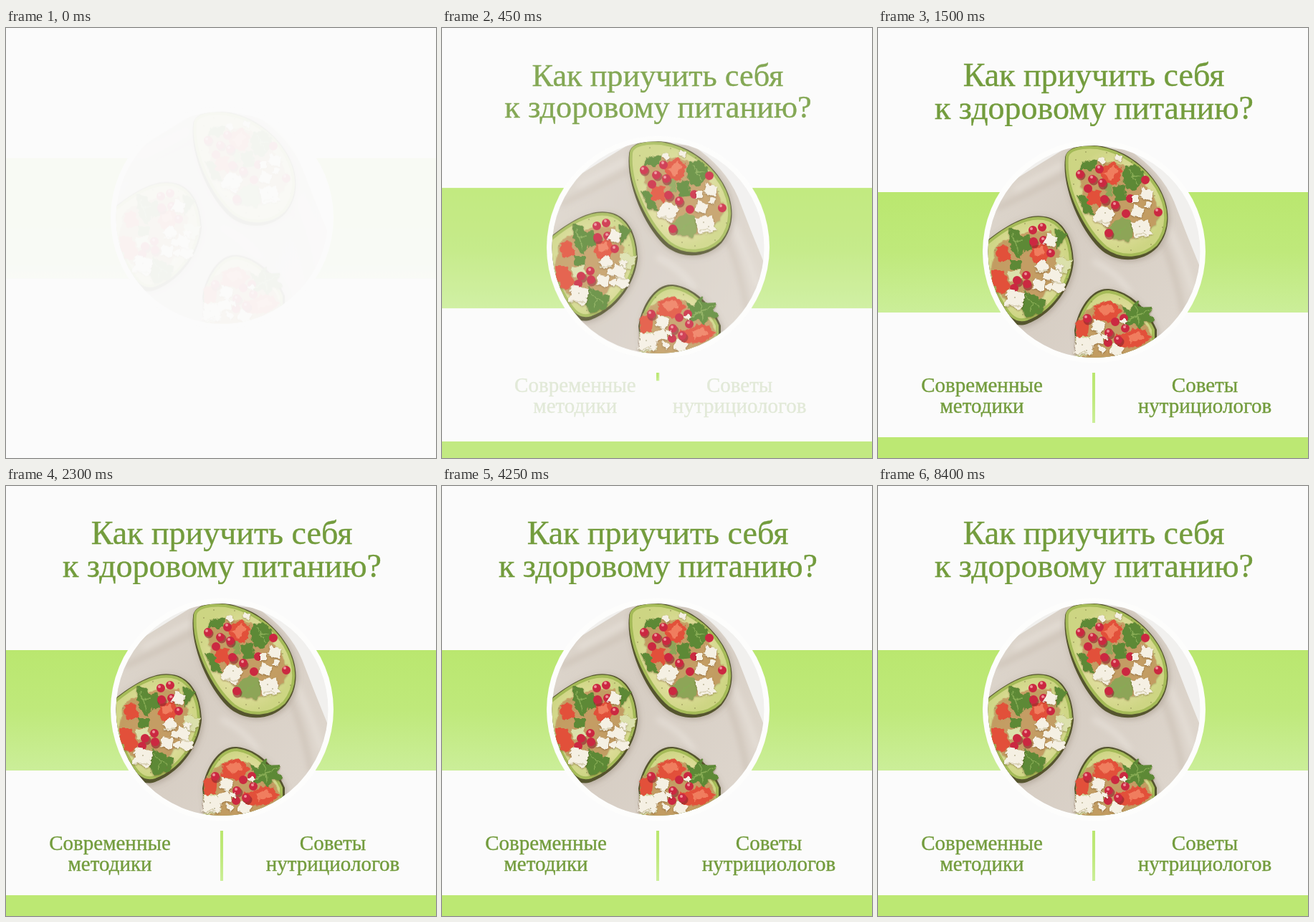
These frames come from a looping animation (600 px wide and 600 px high, 10000 ms). An HTML page:

```html
<!DOCTYPE html>
<html lang="ru">
<head>
<meta charset="utf-8">
<title>Здоровое питание</title>
<style>
  html, body { margin: 0; width: 100%; height: 100%; overflow: hidden; background: #fbfbfb; }
  svg { display: block; width: 100vw; height: 100vh; }
  text { font-family: "Liberation Serif", "Times New Roman", serif; fill: #739c3d; stroke: #739c3d; stroke-width: .4px; text-anchor: middle; }
  .title { font-size: 46px; transform-origin: 301px 90px; --from: scale(.7); --alpha: 0; }
  .caption { font-size: 29px; }
  .left { --from: translateX(50px); }
  .right { --from: translateX(-50px); }
  .hero { --from: translateY(-47.5px); }
  .strip { --from: translateY(47.5px); }
  .divider { transform-origin: 301px 481px; }
  .enter { animation: enter 10s infinite; }
  .late { animation: late 10s infinite; }
  .divider { animation: grow 10s infinite; }
  .enter, .late, .divider { animation-timing-function: cubic-bezier(.3333, 1, .6667, 1); }

  @keyframes enter {
    0% { transform: var(--from); opacity: var(--alpha, .05); }
    9%, 100% { transform: none; opacity: 1; }
  }
  @keyframes late {
    0%, 4.1% { transform: var(--from); opacity: 0; }
    10.4%, 100% { transform: none; opacity: 1; }
  }
  @keyframes grow {
    0%, 4.15% { transform: scaleY(0); }
    10.4%, 100% { transform: none; }
  }

  .dots path { fill: none; stroke-linecap: round; }
  .cubes path { fill: none; stroke-linecap: square; }
  .skin { fill: #55552f; }
  .flesh { fill: url(#flesh); stroke: #a5bb58; stroke-width: 4; }
  .mix { fill: #c99b62; opacity: .8; }
  .leaf { fill: #5d8936; }
  .vein { fill: none; stroke: #88ac55; stroke-width: 1.5; }
  .pale { fill: #8da557; }
  .tomato { fill: #e2503a; }
  .glow { fill: #f07d5e; }
  .cucumber { fill: #dbe0ab; }
</style>
</head>
<body>
<svg viewBox="0 0 600 600">
  <defs>
    <linearGradient id="lime" x2="0" y2="1">
      <stop stop-color="#bae76f"/>
      <stop offset=".5" stop-color="#bfe97b"/>
      <stop offset="1" stop-color="#cbee99"/>
    </linearGradient>
    <linearGradient id="cloth" x2="1" y2=".6">
      <stop stop-color="#dfd8cf"/>
      <stop offset=".45" stop-color="#d6cdc3"/>
      <stop offset="1" stop-color="#ddd5cc"/>
    </linearGradient>
    <radialGradient id="flesh">
      <stop offset=".5" stop-color="#e3dfa0"/>
      <stop offset="1" stop-color="#cdd583"/>
    </radialGradient>
    <clipPath id="plate"><circle cx="301.5" cy="312" r="148"/></clipPath>
    <filter id="soft"><feGaussianBlur stdDeviation="4"/></filter>
    <filter id="shade"><feDropShadow dx="2" dy="2" stdDeviation="4" flood-color="#7d6d5c" flood-opacity=".4"/></filter>
    <filter id="ragged" color-interpolation-filters="sRGB">
      <feTurbulence type="fractalNoise" baseFrequency=".13" numOctaves="2" seed="4"/>
      <feDisplacementMap in="SourceGraphic" scale="8" xChannelSelector="R" yChannelSelector="G"/>
      <feDropShadow dx="0" dy="1" stdDeviation="1" flood-color="#5d3a18" flood-opacity=".45"/>
    </filter>
  </defs>

  <g class="hero enter">
    <rect y="229" width="600" height="168" fill="url(#lime)"/>
    <circle cx="301.5" cy="312" r="155.5" fill="#fdfdfc"/>
    <g clip-path="url(#plate)">
      <rect x="150" y="160" width="304" height="304" fill="#f1f0ee"/>
      <path d="M150 238Q205 202 268 164L350 170Q395 200 413 242Q432 292 452 340V470H150Z" fill="url(#cloth)"/>
      <g fill="none" stroke-width="5" filter="url(#soft)">
        <path d="M165 252Q220 226 262 204M398 300Q418 350 426 400" stroke="#cabfb3"/>
        <path d="M190 226L258 190M300 325Q340 345 352 372M404 275Q428 325 440 368" stroke="#e9e3dc"/>
      </g>

      <g filter="url(#shade)">
        <path class="skin" d="M261 182C262 167 283 162 306 164C341 169 373 190 392 222C410 253 408 284 390 306C370 327 336 329 313 311C286 289 256 226 261 182Z"/>
        <path class="skin" d="M148 300C175 278 206 258 232 263C260 267 272 295 273 326C270 363 243 400 208 413C187 420 176 402 166 383C154 358 148 330 148 300Z"/>
        <path class="skin" d="M274 422C279 391 298 362 322 364C352 367 377 393 389 421V470H279Z"/>
      </g>
      <path class="flesh" d="M264 180C265 169 285 165 306 167C338 172 370 192 389 223C406 252 405 281 388 302C369 320 340 322 318 306C291 283 260 226 264 180Z"/>
      <path class="flesh" d="M148 304C176 280 207 262 231 266C256 270 268 296 269 325C266 360 240 394 208 406C190 412 180 396 171 379C158 356 148 333 148 304Z"/>
      <path class="flesh" d="M278 422C284 393 300 368 322 368C349 371 372 396 384 421V470H282Z"/>

      <g filter="url(#ragged)">
        <path class="mix" d="M280 196Q309 177 350 195Q385 225 394 260Q381 290 343 295Q315 281 288 244Z"/>
        <path class="mix" d="M164 305Q200 279 239 284Q266 318 246 356Q218 395 185 386Q160 360 159 338Z"/>
        <path class="mix" d="M280 410Q300 375 335 385Q370 405 382 429V470H283Z"/>

        <path class="leaf" d="M345 192Q372 188 371 210Q365 228 349 226Q337 211 345 192ZM283 187L305 183L304 198L282 198ZM278 232L290 235L303 262L288 258ZM327 222L344 218L348 240L332 242Z"/>
        <path class="pale" d="M323 279Q335 259 354 270Q359 288 351 298L327 295ZM314 220L325 214L328 234L319 235Z"/>
        <path class="leaf" d="M184 279Q202 277 205 308L198 323Q178 307 184 279ZM205 368L235 381L229 397L207 405L200 389ZM246 279L264 288L250 308ZM185 324L200 324L199 338L184 336ZM201 292L212 289L216 310L205 313Z"/>
        <path class="vein" d="M350 197L362 219M353 208L367 206M187 285L197 315M189 298L201 297M206 374L227 390M211 397L217 382M329 291L349 274"/>
        <path class="cucumber" d="M250 318L271 326L264 343L246 339ZM180 340L198 337L201 349L184 354ZM275 430L298 431L300 456L277 459Z"/>

        <path class="tomato" d="M309 197L328 187L342 199L333 219L316 216ZM294 224L312 227L310 248L291 245ZM165 306L180 303L187 324L168 326ZM216 304L233 298L242 318L225 330L211 319ZM159 338L174 338L185 361L172 374L158 354ZM302 387L325 380L340 394L328 412L300 405ZM330 429L365 418L381 431L367 445L334 446ZM276 411L295 403L293 429L277 432Z"/>
        <path class="glow" d="M315 203L329 192L335 200L323 211ZM217 309L230 304L231 316L219 319ZM306 390L322 385L332 394L313 401ZM347 430L364 423L370 432L352 439Z"/>
        <path class="leaf" d="M340 389L352 393L361 380L368 390L382 389L380 400L388 409L374 410L366 420L357 412L345 416L348 404Z"/>
        <path class="vein" d="M348 408L380 393M361 386L363 412"/>
      </g>
      <g class="dots">
        <path stroke="#8d1f2c" stroke-width="13" opacity=".6" d="M283 206h0M301 213h0M314 219h0M318 242h0M332 250h0M323 289h0M218 301h0M196 355h0M209 360h0M293 408h0M324 428h0M337 438h0"/>
        <path stroke="#cb2841" stroke-width="12" d="M282 204h0M299 211h0M309 197h0M313 216h0M293 224h0M316 239h0M331 247h0M352 238h0M391 257h0M373 212h0M346 259h0M322 286h0M216 282h0M229 278h0M217 298h0M231 296h0M241 314h0M194 352h0M207 345h0M208 357h0M190 363h0M292 405h0M322 425h0M335 435h0M321 439h0M331 410h0M345 419h0M343 405h0"/>
        <path stroke="#f0929b" stroke-width="4" d="M280 202h0M298 208h0M308 194h0M311 214h0M330 245h0M389 254h0M214 280h0M228 275h0M230 294h0M240 312h0M206 343h0M290 403h0M321 423h0M334 433h0M344 417h0"/>
      </g>
      <g filter="url(#ragged)">
        <g class="cubes" stroke="#f5f0e3">
          <path stroke-width="23" d="M315 262l1 .5M367 280l1 -.2M190 378l1 .3M287 444l1 .1"/>
          <path stroke-width="15" d="M361 256l1 .4M374 231l1 .3M240 296l1 .4M229 333l1 -.6M246 345l1 .5M225 358l1 .2M251 360l1 .6M307 416l1 .5M304 435l1 -.4M333 450l1 .4"/>
          <path stroke-width="8" d="M336 181l1 .4M311 185l1 .6M359 238l1 0M377 247l1 .4M235 347l1 .4M239 361l1 -.5M252 334l1 .5M311 448l1 .6M343 409l1 .6M316 431l1 .3"/>
        </g>
        <path fill="none" stroke="#d9d1b5" stroke-width="2" d="M306 270l17 2M359 288l16 -1M181 387l17 1M219 340l18 -2M241 354l17 3M279 453l16 0M302 424l11 2"/>
      </g>
      <g class="dots">
        <path stroke="#77703f" stroke-width="1.3" d="M276 184h0M290 173h0M319 174h0M354 187h0M386 234h0M397 278h0M381 302h0M353 310h0M335 305h0M307 282h0M287 254h0M273 218h0M317 258h0M365 277h0M372 283h0M163 310h0M184 281h0M205 273h0M241 275h0M261 309h0M264 350h0M250 374h0M224 393h0M202 400h0M191 376h0M286 404h0M298 382h0M337 378h0M285 442h0M291 450h0"/>
      </g>
    </g>
  </g>

  <g class="title enter">
    <text x="301" y="81">Как приучить себя</text>
    <text x="301.5" y="126.5">к здоровому питанию?</text>
  </g>

  <g class="caption left late">
    <text x="145" y="508">Современные</text>
    <text x="145" y="537">методики</text>
  </g>
  <g class="caption right late">
    <text x="456" y="508">Советы</text>
    <text x="456" y="537">нутрициологов</text>
  </g>

  <rect class="divider" x="299" y="481" width="4" height="70" fill="url(#lime)"/>
  <rect class="strip enter" y="571" width="600" height="29" fill="#bce873"/>
</svg>
</body>
</html>
```
